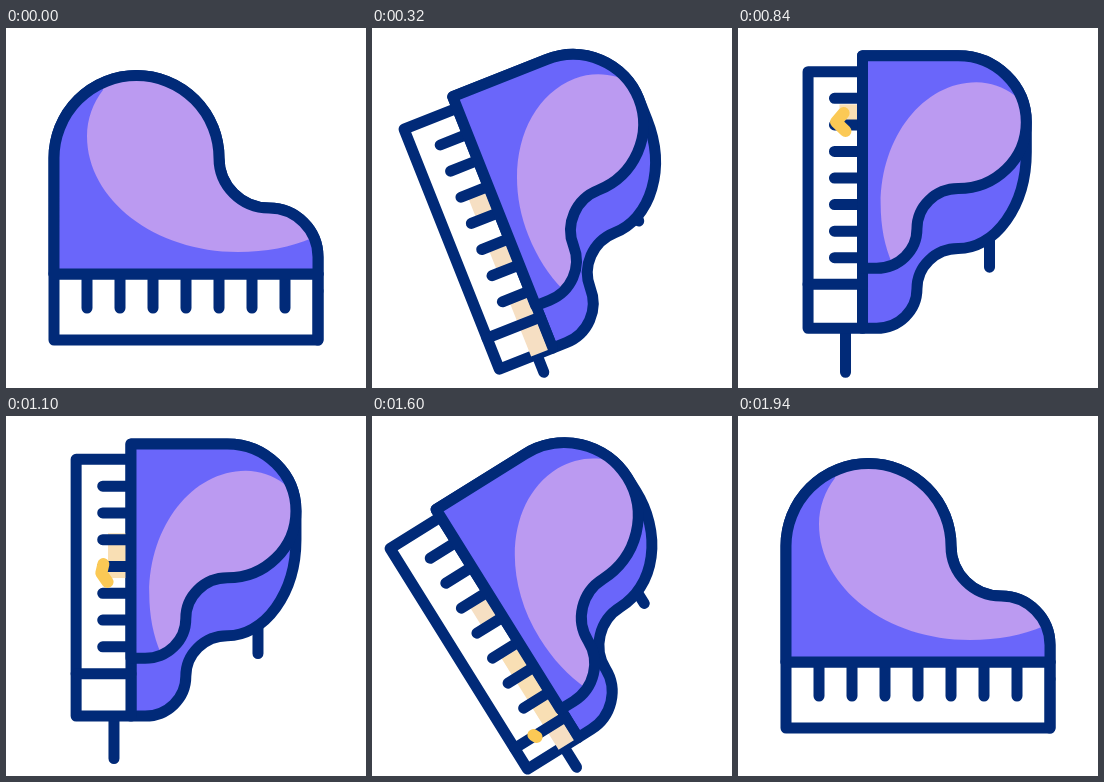
Animation, 360 px wide and 360 px high, one loop 2.4 s. Source, as an HTML page:

```html
<!DOCTYPE html>
<html lang="en">
<head>
<meta charset="utf-8">
<title>Piano</title>
<style>
  html, body { margin: 0; width: 100%; height: 100%; overflow: hidden; background: #fff; }
  svg { display: block; width: 100vw; height: 100vh; }
  .line { fill: none; stroke: #012a78; stroke-width: 11; stroke-linecap: round; stroke-linejoin: round; }
  .case { fill: #6a66fa; }
  .white { fill: #fff; }
  .shine { fill: #bb9af1; }
  .glow { fill: #f6dfc3; }
  .trail { fill: #f9dfb4; }
  .spark { fill: none; stroke: #fbc955; stroke-width: 12; stroke-linecap: round; stroke-linejoin: round; }
</style>
</head>
<body>
<svg viewBox="0 0 360 360">
  <defs><clipPath id="lidClip"><path id="clip"/></clipPath></defs>
  <g id="piano">
    <path id="legs" class="line"/>
    <path id="body" class="line case"/>
    <path id="board" class="line white"/>
    <path id="glow" class="glow"/>
    <path id="trail" class="trail"/>
    <path id="keys" class="line"/>
    <path id="lid" class="case"/>
    <path id="shine" class="shine" clip-path="url(#lidClip)"/>
    <path id="rim" class="line"/>
    <path id="spark" class="spark"/>
  </g>
</svg>
<script>
const LOOP = 2400;
const el = id => document.getElementById(id);
const draw = (id, d) => el(id).setAttribute('d', d);
const fade = (id, v) => el(id).setAttribute('opacity', v);
const clamp = v => Math.min(1, Math.max(0, v));

// Cubic easing whose end points are flat
function ease(u, x1, x2) {
  u = clamp(u);
  let lo = 0, hi = 1;
  for (let i = 0; i < 24; i++) {
    const s = (lo + hi) / 2, q = 1 - s;
    if (3 * q * q * s * x1 + 3 * q * s * s * x2 + s * s * s < u) lo = s; else hi = s;
  }
  return lo * lo * (3 - 2 * lo);
}

const lightOn = (x0, x1) => `M${x0},5 H${x1} V23 H${x0} Z `;

function render(t) {
  const opening = ease(t / 540, .38, .45);
  const turn = opening * (1 - ease((t - 1240) / 700, .575, .7));
  const fold = opening * (1 - ease((t - 800) / 1140, .9, .7));

  const sx = 1 - .195 * fold, sy = 1 - .175 * fold;
  const p = (x, y) => `${x * sx},${y * sy} `;

  // Lid outline; depth lengthens it along the front edge
  const shape = depth => {
    const arc = (rx, ry, sweep, x, y) => `A${rx},${ry * sy} 0 0 ${sweep} ${x},${y * sy} `;
    const at = x => x * sx + depth;
    return `M0,0 L${p(0, -116)}` + arc(82.5 * sx, 82.5, 1, 82.5 * sx, -198.5) +
      `h${depth / 2} ` + arc(82.5 * sx + depth / 2, 82.5, 1, at(165), -116) +
      arc(50 * sx, 50, 0, at(215), -66) + arc(49 * sx, 49, 1, at(264), -17) + `L${at(264)},0 Z`;
  };

  // Placement: local x runs along the front edge, y away from the lid
  const a = turn * Math.PI / 2, cos = Math.cos(a), sin = Math.sin(a);
  const half = 132 + 4.25 * fold, drop = 66 - 10.5 * fold;
  const cx = 180 + 25 * fold * (1 - fold) - drop * sin - half * cos;
  const cy = 180 - 16 * turn ** 3 + drop * cos - half * sin;
  el('piano').setAttribute('transform', `translate(${cx} ${cy}) rotate(${turn * 90})`);

  const lid = shape(0);
  draw('body', shape(60 * fold));
  for (const id of ['lid', 'rim', 'clip']) draw(id, lid);
  draw('shine', `M${p(49, -184)}C${p(39, -171)}${p(33, -155)}${p(33, -138)}` +
    `C${p(33, -74)}${p(101, -22)}${p(184, -22)}C${p(212, -22)}${p(237, -27)}${p(258, -36)}` +
    `L${p(300, -60)}L${p(300, -220)}L${p(49, -220)}Z`);

  // Keyboard: top face, then the side face that unfolds
  const left = 16 * fold, deep = 66 * sy;
  const side = left + 264 * sx, end = side + 44 * fold;
  const keyX = i => left + 33 * i * sx;
  draw('board', `M${left},0 H${end} V${deep} H${left} Z`);
  let keys = `M${side},0 v${deep} `;
  for (let i = 1; i < 8; i++) keys += `M${keyX(i)},0 v${34 * sy} `;
  draw('keys', keys);

  const leg = 44 * fold * opening ** 2;
  draw('legs', `M${end - 4},17 H${end + leg} M150,-127 H${163 + 1.1 * leg}`);

  // Warm light on every other key while the piano turns
  let glow = lightOn(side, end);
  for (let i = 3; i < 8; i += 2) glow += lightOn(keyX(i), keyX(i + 1));
  draw('glow', glow);
  fade('glow', clamp(6 * turn * (1 - turn)));

  // A spark runs down the keys, unbending and shrinking, with a trail behind
  const run = clamp((t - 635) / 1000), along = 244 * run;
  const x = left + along, y = 24 + .05 * along;
  const size = 9 * (1 - run ** 6), bend = 12 * clamp(1 - 1.4 * run), tilt = run * size / 2;
  draw('spark', `M${x - size},${y - bend + tilt} L${x},${y} L${x + size},${y - bend - tilt}`);
  draw('trail', lightOn(left + .65 * along, x + 5));
  const shown = clamp((t - 640) / 80) * clamp((1680 - t) / 60);
  fade('spark', shown);
  fade('trail', shown);
}

const start = performance.now();
function tick() {
  render((performance.now() - start) % LOOP);
  requestAnimationFrame(tick);
}
render(0);
requestAnimationFrame(tick);
</script>
</body>
</html>
```
